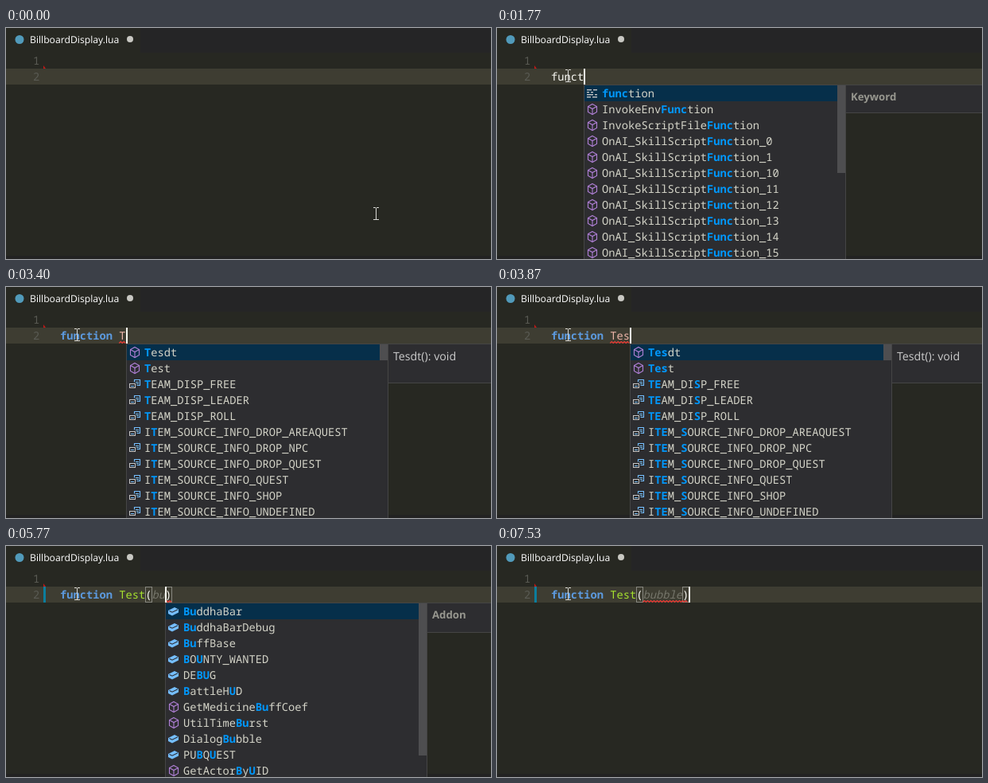
These frames come from a looping animation (610 px wide and 290 px high, 8 s). An HTML page with a canvas:

```html
<!DOCTYPE html>
<html lang="en">
<head>
<meta charset="utf-8">
<title>Editor autocomplete</title>
<style>
html, body { margin: 0; width: 100%; height: 100%; overflow: hidden; background: #272822; }
canvas { display: block; }
</style>
</head>
<body>
<canvas id="stage" width="610" height="290"></canvas>
<script>
const ctx = document.getElementById('stage').getContext('2d');
ctx.textRendering = 'geometricPrecision';

const LOOP = 8000;
const CELL = 8.25, LEFT = 68, LINE = 51, ROW = 20;
const MONO = '13.75px "Noto Sans Mono", monospace';
const SANS = '"Open Sans", sans-serif';
const WHITE = '#f8f8f2', BLUE = '#75beff', RED = '#f03a34';

const skill = [0, 1, 10, 11, 12, 13, 14, 15].map(n => 'OnAI_SkillScriptFunction_' + n);
const source = ['DROP_AREAQUEST', 'DROP_NPC', 'DROP_QUEST', 'QUEST', 'SHOP', 'UNDEFINED']
  .map(s => 'ITEM_SOURCE_INFO_' + s);

const lists = {
  func: {
    items: ['function', 'InvokeEnvFunction', 'InvokeScriptFileFunction', ...skill],
    icon: s => s === 'function' ? 'keyword' : 'method',
    thumb: 110, docHeight: 35, doc: () => 'Keyword', bold: true
  },
  test: {
    items: ['Tesdt', 'Test', 'TEAM_DISP_FREE', 'TEAM_DISP_LEADER', 'TEAM_DISP_ROLL', ...source],
    icon: s => s.startsWith('Tes') ? 'method' : 'member',
    thumb: 20, docHeight: 49, doc: s => s + '(): void', bold: false
  },
  addon: {
    items: ['BuddhaBar', 'BuddhaBarDebug', 'BuffBase', 'BOUNTY_WANTED', 'DEBUG', 'BattleHUD',
      'GetMedicineBuffCoef', 'UtilTimeBurst', 'DialogBubble', 'PUBQUEST', 'GetActorByUID'],
    icon: s => /^(Get|Util)/.test(s) ? 'method' : 'field',
    thumb: 191, docHeight: 37, doc: () => 'Addon', bold: true, filter: true
  }
};

// Each entry changes part of the editor state from its time on.
const steps = [
  [0, { text: '', col: 0, list: null, query: '', wave: null, bar: false }],
  [1130, { text: 'f', col: 1 }],
  [1230, { list: 'func', query: 'f' }],
  [1300, { text: 'fu', col: 2 }],
  [1330, { query: 'fu' }],
  [1430, { text: 'fun', col: 3 }],
  [1470, { query: 'fun' }],
  [1570, { text: 'func', col: 4 }],
  [1600, { query: 'func' }],
  [1770, { text: 'funct', col: 5 }],
  [1800, { query: 'funct' }],
  [1830, { text: 'functi', col: 6 }],
  [1870, { query: 'functi' }],
  [1900, { text: 'functio', col: 7 }],
  [1930, { query: 'functio' }],
  [2070, { text: 'function', col: 8, query: 'function' }],
  [2270, { wave: [0, 8] }],
  [2470, { text: 'function ', col: 9, list: null }],
  [3170, { text: 'function T', col: 10 }],
  [3300, { list: 'test', query: 'T' }],
  [3400, { wave: [9, 10] }],
  [3630, { text: 'function Te', col: 11, query: 'Te' }],
  [3670, { text: 'function Tes', col: 12 }],
  [3700, { query: 'Tes' }],
  [3870, { wave: [9, 12] }],
  [3930, { text: 'function Test', col: 13 }],
  [3970, { query: 'Test' }],
  [4000, { bar: true }],
  [4170, { wave: [9, 13] }],
  [4400, { text: 'function Test()', col: 14, list: null }],
  [4470, { col: 15 }],
  [4630, { wave: [14, 15] }],
  [5030, { col: 14 }],
  [5470, { text: 'function Test(b)', col: 15, wave: [15, 16] }],
  [5570, { list: 'addon', query: 'b' }],
  [5700, { text: 'function Test(bu)', col: 16, wave: [16, 17] }],
  [5730, { query: 'bu' }],
  [5930, { text: 'function Test(bub)', col: 17, wave: [17, 18] }],
  [5970, { query: 'bub' }],
  [6070, { text: 'function Test(bubb)', col: 18, wave: [18, 19] }],
  [6100, { query: 'bubb' }],
  [6300, { wave: [14, 19] }],
  [6600, { text: 'function Test(bubbl)', col: 19, query: 'bubbl', wave: [14, 20] }],
  [6800, { text: 'function Test(bubble)', col: 20 }],
  [6830, { query: 'bubble' }],
  [7000, { wave: [14, 21] }],
  [7430, { list: null }],
  [7470, { col: 21 }]
];

const stateAt = t => Object.assign({}, ...steps.filter(s => s[0] <= t).map(s => s[1]));
const xAt = col => LEFT + col * CELL;

function rect(x, y, w, h, color) {
  ctx.fillStyle = color;
  ctx.fillRect(x, y, w, h);
}

function write(str, x, y, color, font = MONO) {
  ctx.font = font;
  ctx.fillStyle = color;
  ctx.fillText(str, x, y);
}

function disc(x, y, r, color) {
  ctx.fillStyle = color;
  ctx.beginPath();
  ctx.arc(x, y, r, 0, Math.PI * 2);
  ctx.fill();
}

function path(points, color, fill, close = true) {
  ctx.beginPath();
  points.forEach(([x, y]) => ctx.lineTo(x, y));
  if (close) ctx.closePath();
  if (fill) {
    ctx.fillStyle = color;
    ctx.fill();
  } else {
    ctx.strokeStyle = color;
    ctx.lineWidth = 1.1;
    ctx.stroke();
  }
}

// Indexes of matched letters: a run if there is one, else letters in order.
function match(item, query) {
  const s = item.toLowerCase(), q = query.toLowerCase();
  const run = s.indexOf(q);
  if (run >= 0) return [...q].map((_, i) => run + i);
  const hits = [];
  let from = 0;
  for (const ch of q) {
    const i = s.indexOf(ch, from);
    if (i < 0) break;
    hits.push(i);
    from = i + 1;
  }
  return hits;
}

function ranked(list, query) {
  if (query.length < 3) return list.items;
  const isRun = s => s.toLowerCase().includes(query.toLowerCase());
  return list.items
    .filter(s => !list.filter || match(s, query).length === query.length)
    .sort((a, b) => isRun(b) - isRun(a));
}

const icons = {
  keyword(x, y) {
    [[0, 0, 6], [8, 0, 5], [0, 3, 3], [5, 3, 3], [0, 6, 8], [10, 6, 3], [0, 9, 5], [7, 9, 6]]
      .forEach(([dx, dy, w]) => rect(x + dx, y - 5 + dy, w, 1.4, '#c5c5c5'));
  },
  method(x, y) {
    const c = '#b180d7';
    path([[x + 7, y - 6.5], [x + 12.5, y - 3.5], [x + 12.5, y + 3.5], [x + 7, y + 6.5],
      [x + 1.5, y + 3.5], [x + 1.5, y - 3.5]], c);
    path([[x + 1.5, y - 3.5], [x + 7, y - .5], [x + 12.5, y - 3.5]], c, false, false);
    path([[x + 7, y - .5], [x + 7, y + 6.5]], c, false, false);
  },
  field(x, y) {
    path([[x, y - 1], [x + 8, y - 5], [x + 13, y - 2.5], [x + 13, y + 1.5],
      [x + 5, y + 5.5], [x, y + 3]], BLUE, true);
    path([[x + 1.5, y - .5], [x + 5, y + 1.2], [x + 12, y - 2.2]], '#2d2d30', false, false);
  },
  member(x, y) {
    ctx.lineWidth = 1;
    ctx.strokeStyle = '#c5c5c5';
    ctx.strokeRect(x + .5, y - .5, 7, 5);
    rect(x + 2, y + 2, 4, 1, BLUE);
    path([[x + 6.5, y - 2.5], [x + 6.5, y - 5.5], [x + 13.5, y - 5.5], [x + 13.5, y + 1.5],
      [x + 9.5, y + 1.5]], BLUE, false, false);
    rect(x + 8, y - 3, 4, 1, BLUE);
    rect(x + 9, y - 1, 3, 1, BLUE);
  }
};

function drawRow(item, kind, query, x, y) {
  icons[kind](x + 4, y + 10);
  const hits = match(item, query);
  // Neighbouring letters of one style are drawn together.
  for (let a = 0; a < item.length;) {
    const on = hits.includes(a);
    let b = a + 1;
    while (b < item.length && hits.includes(b) === on) b++;
    write(item.slice(a, b), x + 23 + a * CELL, y + 15, on ? '#0097fb' : '#d4d4c8',
      (on ? 'bold ' : '') + MONO);
    a = b;
  }
}

function panel(x, y, w, h) {
  rect(x, y, w, h, '#454545');
  rect(x + 1, y + 1, w - 2, h - 2, '#2d2d30');
}

function drawPopup({ list: key, query, col }) {
  const list = lists[key], items = ranked(list, query);
  const x = Math.round(xAt(col)), y = 71, w = 330;
  const full = items.length === list.items.length;
  panel(x, y, w, (full ? 12 : items.length) * ROW + 2);
  rect(x + 1, y + 1, w - 2, ROW, '#062f4a');
  items.forEach((item, i) => drawRow(item, list.icon(item), query, x, y + 1 + i * ROW));
  if (full) rect(x + w - 11, y + 1, 10, list.thumb, '#4e4e50');

  panel(x + w - 1, y, 340, list.docHeight + 1);
  write(list.doc(items[0]), x + w + 6, y + (list.bold ? 20 : 21),
    list.bold ? '#97978f' : '#cccccc', (list.bold ? 'bold 13.2px ' : '14.2px ') + SANS);
}

function drawCode(text) {
  const [, word, name, open, arg, close] = text.match(/^(\w* ?)(\w*)(\(?)(\w*)(\)?)$/);
  const base = LINE + 15;
  const done = word.startsWith('function');
  let col = 0;
  const put = (str, color, style = '') => {
    if (str) write(str, xAt(col), base, color, style + MONO);
    col += str.length;
  };
  put(word, done ? '#5c9ade' : WHITE, done ? 'bold ' : '');
  put(name, open ? '#a6e22e' : '#ecb5a8');
  if (open) {
    ctx.strokeStyle = '#888880';
    ctx.lineWidth = 1;
    [col, col + 1 + arg.length].forEach(c =>
      ctx.strokeRect(Math.round(xAt(c)) + .5, LINE + .5, 8, ROW - 1));
  }
  put(open, WHITE);
  put(arg, '#75756a', 'italic ');
  put(close, WHITE);
}

function drawWave([from, to]) {
  const a = xAt(from), b = xAt(to);
  const points = [];
  for (let x = a, i = 0; x <= b; x += 2, i++) points.push([x, i % 2 ? 68.5 : 70.5]);
  path(points, RED, false, false);
}

function drawPointer(t) {
  const p = Math.min(1, Math.max(0, t / 630));
  const e = p * p * (3 - 2 * p);
  const x = Math.round(465 - 376 * e), y = Math.round(233 - 173 * e);
  const c = '#d8d8d4';
  rect(x, y - 7, 1, 15, c);
  [y - 8, y + 7].forEach(v => {
    rect(x - 3, v, 3, 1, c);
    rect(x + 1, v, 3, 1, c);
  });
}

function drawFrame() {
  rect(0, 0, 610, 290, '#272822');
  rect(169, 0, 441, 31, '#252526');
  rect(0, 286, 610, 4, '#222222');
  disc(17, 14.5, 5.5, '#519aba');
  write('BillboardDisplay.lua', 30, 19, '#ffffff', '12.2px ' + SANS);
  disc(156, 14, 4, '#c8c8c2');
  rect(0, LINE, 610, ROW, '#3e3d32');
  write('1', 34, 46, '#5a5b54');
  write('2', 34, 66, '#5a5b54');
  path([[47, 47], [50, 51], [47, 51]], '#c01818', true);
}

function draw(t) {
  const s = stateAt(t);
  drawFrame();
  if (s.bar) rect(47, LINE, 3, ROW, '#0c7d9d');
  drawCode(s.text);
  if (s.wave) drawWave(s.wave);
  const caretOn = t >= 1070 || (t >= 70 && t < 570);
  if (caretOn) rect(Math.round(xAt(s.col)), LINE, 2, ROW, '#f8f8f0');
  if (s.list) drawPopup(s);
  drawPointer(t);
}

function tick() {
  draw(performance.now() % LOOP);
  requestAnimationFrame(tick);
}
tick();
</script>
</body>
</html>
```
